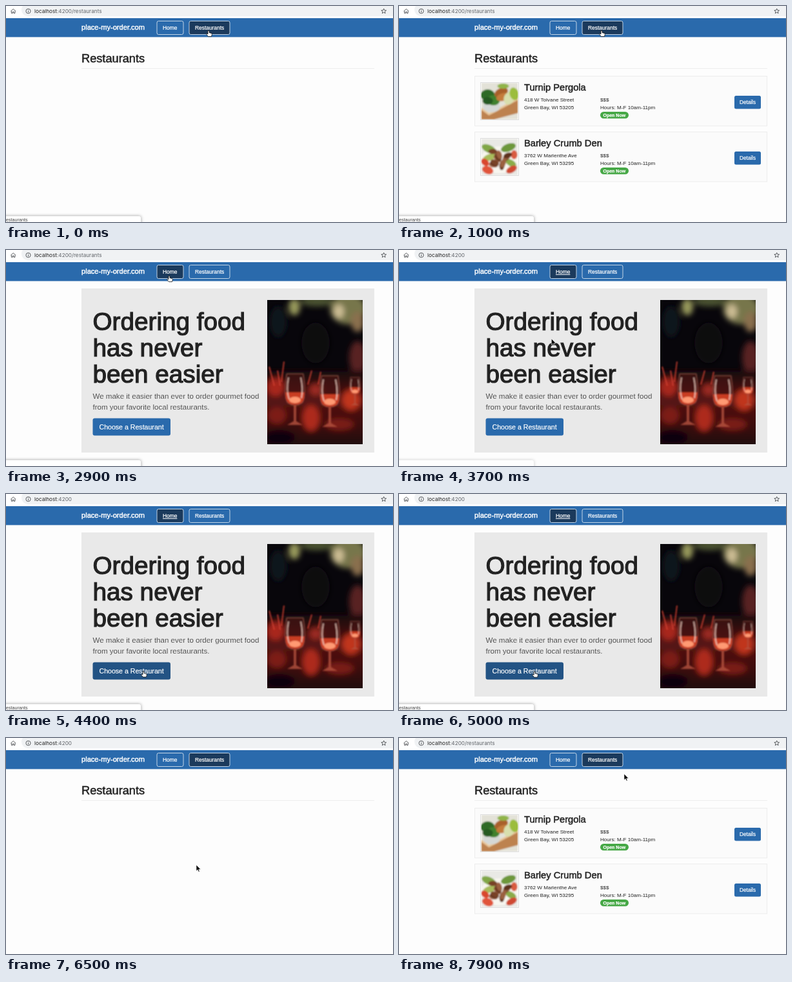
Write an HTML page that moves like this. It is 600x337 px and loops after 8000 ms.

```html
<!DOCTYPE html>
<html lang="en">
<head>
<meta charset="utf-8">
<title>Restaurant ordering demo</title>
<style>
html, body { margin: 0; height: 100%; overflow: hidden; background: #fdfdfd; }
svg { display: block; width: 100%; height: 100%; font-family: "Liberation Sans", Arial, sans-serif; }
text { fill: #222; white-space: pre; }
.medium { stroke: #222; stroke-width: .5; }
.headline { stroke-width: 1.2; }
.light { fill: #2a2a2a; stroke: #e9e9e9; stroke-width: .22; }
.white { fill: #fff; stroke: #fff; stroke-width: .22; }
.brand { stroke-width: .45; }
.address { font-family: Inter, sans-serif; font-size: 8.2px; }
.nav rect { stroke: #d3e0ed; stroke-width: .9; }
.small { font-size: 8.1px; }
.icon { fill: none; stroke: #4a4d51; stroke-width: .9; stroke-linejoin: round; }
</style>
</head>
<body>
<svg viewBox="0 0 600 337">
  <defs>
    <filter id="blur" x="-50%" y="-50%" width="200%" height="200%"><feGaussianBlur stdDeviation="4"/></filter>
    <filter id="soft" x="-50%" y="-50%" width="200%" height="200%"><feGaussianBlur stdDeviation=".8"/></filter>
    <filter id="shadow" x="-10%" y="-60%" width="120%" height="220%"><feDropShadow dx="0" dy="0" stdDeviation="2" flood-opacity=".3"/></filter>
    <linearGradient id="table" x2="0" y2="1">
      <stop stop-color="#16060b"/><stop offset=".35" stop-color="#571413"/>
      <stop offset=".65" stop-color="#3c0c0d"/><stop offset="1" stop-color="#140506"/>
    </linearGradient>
    <clipPath id="photoClip"><path d="M405 78h148v225h-148z"/></clipPath>
    <clipPath id="thumbClip"><path d="M0 0h57v57H0z"/></clipPath>
    <g id="glass">
      <path d="M-13-34Q-18 0-12 11Q0 20 12 11Q18 0 13-34Z" fill="#4a1512" fill-opacity=".6" stroke="#b06a5c" stroke-width=".8"/>
      <path d="M-15-5Q-15 8-10 12Q0 17 10 12Q15 8 15-5Z" fill="#c93c22"/>
      <ellipse cy="7" rx="9" ry="5" fill="#ff9a73"/>
      <path d="M-10-28Q-14-8-9 6M9-28Q13-10 10 4" fill="none" stroke="#ffe0d2" stroke-width="1.8" opacity=".8"/>
      <path d="M-2 15V40L-12 46H12L2 40V15" fill="#b4513f" opacity=".8"/>
    </g>
  </defs>

  <rect width="600" height="337" fill="#fdfdfd"/>

  <g id="list">
    <text class="medium" x="117" y="88" font-size="18.2">Restaurants</text>
    <path d="M117 97.5H571" stroke="#eee"/>
    <g id="cards"></g>
  </g>

  <g id="home">
    <rect x="117" y="60" width="454" height="256" fill="#e9e9e9"/>
    <g class="medium headline" font-size="38.7">
      <text x="134.5" y="124.5">Ordering food</text>
      <text x="134.5" y="165.5">has never</text>
      <text x="134.5" y="206.5">been easier</text>
    </g>
    <g font-size="11.55">
      <text class="light" x="134.5" y="231.5">We make it easier than ever to order gourmet food</text>
      <text class="light" x="134.5" y="249">from your favorite local restaurants.</text>
    </g>
    <rect id="choose" x="134.5" y="262.5" width="120.5" height="27" rx="3"/>
    <text class="white" x="144.5" y="279.5" font-size="10.6">Choose a Restaurant</text>
    <g clip-path="url(#photoClip)">
      <rect x="405" y="78" width="148" height="225" fill="#08060b"/>
      <g filter="url(#blur)">
        <ellipse cx="422" cy="112" rx="13" ry="24" fill="#11121f"/>
        <ellipse cx="447" cy="89" rx="9" ry="13" fill="#97995c"/>
        <ellipse cx="482" cy="80" rx="26" ry="8" fill="#4c5232"/>
        <ellipse cx="530" cy="92" rx="28" ry="24" fill="#77764c"/>
        <ellipse cx="516" cy="96" rx="8" ry="11" fill="#cdbd94"/>
        <ellipse cx="545" cy="112" rx="10" ry="16" fill="#8a6f4e"/>
        <ellipse cx="480" cy="145" rx="22" ry="32" fill="#0a0710"/>
        <ellipse cx="545" cy="168" rx="13" ry="26" fill="#592122"/>
        <rect x="395" y="188" width="168" height="130" fill="url(#table)"/>
        <ellipse cx="418" cy="214" rx="13" ry="14" fill="#a8281d"/>
        <ellipse cx="480" cy="218" rx="10" ry="9" fill="#9c2c20"/>
        <ellipse cx="535" cy="234" rx="14" ry="16" fill="#c0341f"/>
        <ellipse cx="473" cy="262" rx="13" ry="20" fill="#ad2c1c"/>
        <ellipse cx="420" cy="258" rx="14" ry="13" fill="#7d1a15"/>
        <ellipse cx="517" cy="272" rx="22" ry="9" fill="#7a1b16"/>
        <ellipse cx="424" cy="292" rx="24" ry="11" fill="#0c0508"/>
      </g>
      <g stroke="#d04032" stroke-width="2" opacity=".85" filter="url(#soft)">
        <path d="M408 182L416 212M431 174L427 206M421 188L425 212M474 188L468 210M488 190L484 210"/>
      </g>
      <g filter="url(#soft)">
        <use href="#glass" x="448" y="227"/>
        <use href="#glass" x="502" y="230"/>
        <use href="#glass" transform="translate(541 217) scale(.55)"/>
      </g>
    </g>
  </g>

  <g>
    <rect width="600" height="19" fill="#fff"/>
    <rect x="24" y="-4" width="590" height="20" rx="10" fill="#f0f2f4"/>
    <path class="icon" d="M8.4 7.8V11.2H10.4V9H12V11.2H14V7.8M7.4 8.1L11.2 4.7L15 8.1"/>
    <circle class="icon" cx="34.5" cy="8" r="3.6" stroke-width=".8"/>
    <path class="icon" d="M34.5 7.4V10.2M34.5 5.6V6.5"/>
    <path class="icon" d="M585.7 4.1L586.8 6.7L589.6 6.9L587.4 8.7L588.1 11.4L585.7 9.9L583.3 11.4L584 8.7L581.8 6.9L584.6 6.7Z"/>
    <text class="address" x="44" y="11">localhost<tspan fill="#5f6368">:4200<tspan id="path">/restaurants</tspan></tspan></text>
    <rect y="19" width="600" height="29.5" fill="#2a6aac"/>
    <text class="white brand" x="117" y="37" font-size="11.1">place-my-order.com</text>
    <g class="nav" font-size="8.4">
      <rect id="homeButton" x="234" y="23.5" width="41" height="21" rx="2.5"/>
      <text id="homeLabel" class="white" x="243" y="37">Home</text>
      <rect id="listButton" x="284" y="23.5" width="63" height="21" rx="2.5"/>
      <text class="white" x="293" y="37">Restaurants</text>
    </g>
  </g>

  <g id="status">
    <rect x="-10" y="327.5" width="219.5" height="20" rx="3" fill="#fff" stroke="#ccc" stroke-width=".7" filter="url(#shadow)"/>
    <text id="statusText" x="33.5" y="336.3" font-size="7.2" text-anchor="end">localhost:4200/restaurants</text>
  </g>

  <g id="cursor">
    <path id="arrow" d="M0 0V9.5L2.2 7.5L3.7 11L5.2 10.3L3.8 7H6.8Z" stroke="#fff" stroke-width=".6"/>
    <path id="hand" d="M-1 .8Q0-.6 1 .8V3.6L4.2 4.4Q5.5 4.8 5.3 6.4L4.5 9.6H-.5L-3.2 6.3Q-3.4 4.8-1.8 5.2L-1 6Z" fill="#fff" stroke="#111" stroke-width=".8"/>
  </g>
</svg>
<script>
const $ = id => document.getElementById(id);
const LOOP = 8000, STEP = 100;
const BLUE = '#2a6aac', DARK = '#1b3a5c', PRESSED = '#235384';

const blob = (x, y, rx, ry, fill, turn = 0) =>
  `<ellipse rx="${rx}" ry="${ry}" fill="${fill}" transform="translate(${x} ${y}) rotate(${turn})"/>`;

const friedFood = `<rect width="57" height="57" fill="#e3e2d8"/>
  <path d="M0 41L12 49L57 24V47L20 57H0Z" fill="#bd8250"/>
  <path d="M0 40L12 49L57 25" fill="none" stroke="#e8c79b" stroke-width="3"/>` +
  blob(16, 37, 13, 9, '#d5d8d6') + blob(10, 19, 11, 9, '#2f6b26') + blob(19, 27, 10, 8, '#3f812d') +
  blob(10, 28, 8, 6, '#255a20') + blob(31, 15, 11, 7, '#a9612a', -25) + blob(34, 22, 11, 6, '#c47c3b', -15) +
  blob(43, 24, 8, 10, '#d8dfad', 20) + blob(51, 17, 7, 10, '#9bbd3d', -15) + blob(34, 5, 9, 4, '#90b549');

const salad = `<rect width="57" height="57" fill="#e9e9e5"/>` +
  blob(28, 33, 29, 21, '#f8f6f0') + blob(12, 16, 12, 6, '#81a746', 25) + blob(42, 14, 12, 6, '#6d983a', -20) +
  blob(13, 29, 11, 5, '#a8bc5b', -20) + blob(46, 38, 9, 5, '#8bac48', 30) + blob(6, 37, 7, 5, '#d9472f', 40) +
  blob(10, 49, 9, 6, '#e1543a', 20) + blob(47, 48, 9, 5, '#cf4932', -30) + blob(51, 25, 5, 7, '#d95a40') +
  [...Array(14)].map((_, i) => blob(18 + i * 7 % 27, 20 + i * 11 % 23, 7, 4,
    ['#784328', '#9b6140', '#5f321f'][i % 3], i * 47)).join('');

function card(y, name, street, town, picture) {
  const text = (x, dy, s) => `<text class="small" x="${x}" y="${dy}">${s}</text>`;
  return `<g transform="translate(0 ${y})">
    <rect x="117.5" y=".5" width="453" height="77.5" fill="#fbfbfb" stroke="#ececec"/>
    <rect x="126.5" y="10.5" width="59" height="58" fill="#fff" stroke="#ddd"/>
    <g transform="translate(127.5 11)" clip-path="url(#thumbClip)"><g filter="url(#soft)">${picture}</g></g>
    <text class="medium" x="194" y="23" font-size="14.7">${name}</text>
    ${text(194, 40, street)}${text(194, 52, town)}${text(312, 40, '$$$')}${text(312, 52, 'Hours: M-F 10am-11pm')}
    <rect x="312" y="56" width="44" height="10.5" rx="5.2" fill="#46a846"/>
    <text class="white" x="316.5" y="63.8" font-size="7" font-weight="bold">Open Now</text>
    <rect x="520" y="31" width="41" height="20.5" rx="2.5" fill="${BLUE}"/>
    <text class="white" x="528" y="44.3" font-size="8.2">Details</text>
  </g>`;
}

$('cards').innerHTML =
  card(109, 'Turnip Pergola', '418 W Tolvane Street', 'Green Bay, WI 53205', friedFood) +
  card(196, 'Barley Crumb Den', '3762 W Marlenthe Ave', 'Green Bay, WI 53295', salad);

// Pointer hot spot: time, x, y
const pointerPath = [
  [0, 314, 38], [1300, 314, 38], [1900, 290, 27], [2100, 253, 21], [2400, 253, 40],
  [3300, 253, 40], [4200, 213, 276], [4700, 213, 276], [5500, 204, 277], [5900, 204, 277],
  [6500, 295, 198], [6600, 246, 192], [6800, 207, 222], [7000, 207, 222], [7800, 349, 56], [LOOP, 349, 56]
];

function pointerAt(t) {
  const i = pointerPath.findIndex(p => p[0] > t);
  const [t0, x0, y0] = pointerPath[i - 1], [t1, x1, y1] = pointerPath[i];
  const u = (t - t0) / (t1 - t0), k = u * u * (3 - 2 * u);
  return [x0 + (x1 - x0) * k, y0 + (y1 - y0) * k];
}

const show = (id, on) => $(id).style.display = on ? '' : 'none';
const within = (t, a, b) => t >= a && t < b;
const fade = (t, from, to) => Math.max(0, Math.min(1, (t - from) / 200, (to - t) / 200));

function over(id, [x, y]) {
  const { x: left, y: top, width, height } = $(id).getBBox();
  return within(x, left, left + width) && within(y, top, top + height);
}

function draw(t) {
  const pointer = pointerAt(t);
  const atHome = within(t, 2900, 5800);
  const cardsShown = within(t, 400, 2900) || t >= 7300;

  show('home', atHome);
  show('list', !atHome);
  show('cards', cardsShown);
  show('path', !within(t, 3200, 7100));

  const overHome = over('homeButton', pointer), overList = over('listButton', pointer);
  const overChoose = atHome && over('choose', pointer);
  $('homeButton').setAttribute('fill', atHome || overHome ? DARK : BLUE);
  $('listButton').setAttribute('fill', !atHome || overList ? DARK : BLUE);
  $('choose').setAttribute('fill', overChoose ? PRESSED : BLUE);
  $('homeLabel').style.textDecoration = within(t, 3500, 5800) ? 'underline' : 'none';

  $('status').style.opacity = Math.max(fade(t, -200, 1800), fade(t, 2500, 3800), fade(t, 4100, 6000));
  $('statusText').style.opacity = within(t, 2400, 4000) ? 0 : within(t, 5500, 6000) ? .55 : .85;

  const clickable = overHome || overList || overChoose;
  $('cursor').setAttribute('transform', `translate(${pointer})`);
  show('hand', clickable);
  show('arrow', !clickable);
}

function tick() {
  draw(Math.floor(performance.now() % LOOP / STEP) * STEP);
  requestAnimationFrame(tick);
}
tick();
</script>
</body>
</html>
```
